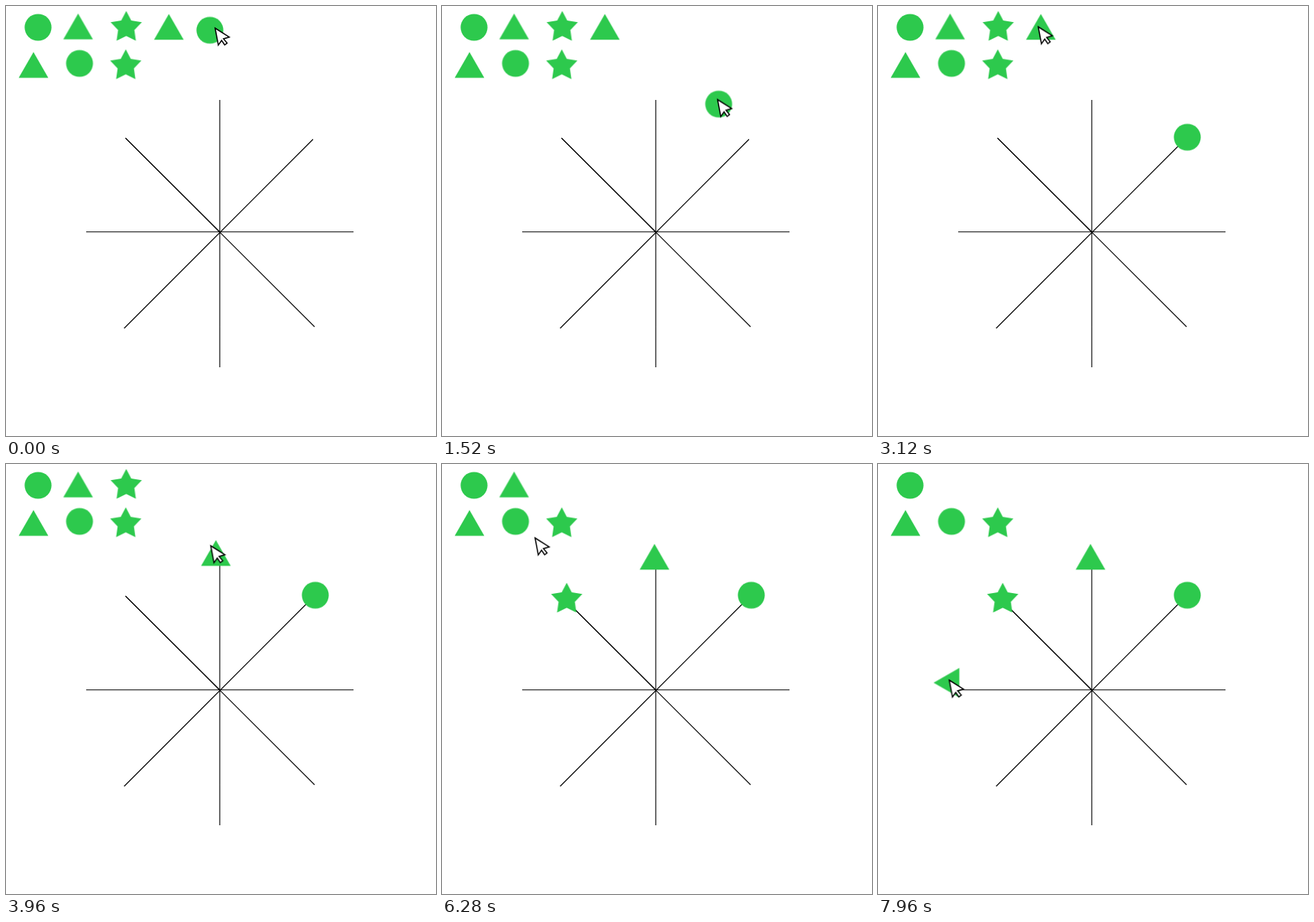
Write an HTML page that moves like this. It is 563x563 px and loops after 8 s.

```html
<!DOCTYPE html>
<html lang="en">
<head>
<meta charset="utf-8">
<title>Sorting shapes onto spokes</title>
<style>
  html, body { margin: 0; width: 100%; height: 100%; overflow: hidden; background: #fff; }
  svg { display: block; width: 100vw; height: 100vh; }
  #shapes { fill: #2dc94d; }
  #spokes { stroke: #000; stroke-width: 1.1; }
  #cursor { fill: #fff; stroke: #000; stroke-width: 1.5; }
</style>
</head>
<body>
<svg viewBox="0 0 563 563">
  <g id="spokes">
    <path d="M279.9 123V473M105 295.8H455M156.5 172.8L404 420M402 174.5L154.7 422"/>
    <path d="M156.5 172.8L280 296"/>
  </g>
  <g id="shapes"></g>
  <path id="cursor" d="M.8 1L19.3 12.7L11.8 15L16.5 20.6L13.3 23L9.3 17L5 23.2Z"/>
</svg>
<script>
const LOOP = 8000, TICK = 40;
const shapes = document.getElementById('shapes');

// Points on a circle, cycling through the given radii, first point up.
const ring = (n, ...radii) => Array.from({ length: n }, (_, i) => {
  const a = 2 * Math.PI * i / n, r = radii[i % radii.length];
  return [r * Math.sin(a), -r * Math.cos(a)].map(v => v.toFixed(2));
}).join(' ');

const kinds = {
  circle: ['circle', { r: 17.6 }],
  triangle: ['polygon', { points: ring(3, 22.4) }],
  star: ['polygon', { points: ring(10, 21.5, 11.2) }]
};

// Something that rests at a place and is sent elsewhere over a span of time.
class Actor {
  constructor(el, x, y) {
    this.el = el;
    this.stops = [{ t: 0, x, y, turn: 0 }];
  }

  go(from, to, change) {
    const last = this.stops.at(-1);
    this.stops.push({ ...last, t: from }, { ...last, ...change, t: to });
  }

  // Linear motion, advancing once per tick; the lead avoids rounding at step edges.
  play() {
    const all = [...this.stops, { ...this.stops.at(-1), t: LOOP }];
    const frames = all.map(({ t, x, y, turn }, i) => {
      const ticks = ((all[i + 1]?.t ?? t) - t) / TICK;
      return {
        offset: t / LOOP,
        transform: `translate(${x}px, ${y}px) rotate(${turn}deg)`,
        easing: `steps(${Math.max(1, Math.round(ticks))}, end)`
      };
    });
    this.el.animate(frames, { duration: LOOP, iterations: Infinity, delay: -1 });
  }
}

const cast = [];

function add(kind, x, y) {
  const [tag, attrs] = kinds[kind];
  const el = document.createElementNS('http://www.w3.org/2000/svg', tag);
  for (const name in attrs) el.setAttribute(name, attrs[name]);
  const actor = new Actor(shapes.appendChild(el), x, y);
  cast.push(actor);
  return actor;
}

add('circle', 42, 28);
const left = add('triangle', 94.4, 32.4);
const star = add('star', 157.4, 28);
const top1 = add('triangle', 213.2, 32.9);
const disc = add('circle', 267, 31.7);
add('triangle', 36, 82.8);
add('circle', 96.3, 75.2);
add('star', 156.8, 78.2);

const hand = new Actor(document.getElementById('cursor'), 273, 28);
cast.push(hand);

let now = 0;
const wait = ms => { now += ms; };

function reach(ms, x, y) {
  hand.go(now, now + ms, { x, y });
  now += ms;
}

function drag(actor, ms, drop, tip) {
  actor.go(now, now + ms, { x: drop[0], y: drop[1] });
  reach(ms, ...tip);
}

wait(360);
drag(disc, 1680, [405, 171.8], [399, 163.5]);
wait(160);
reach(920, 209, 26.3);
wait(120);
drag(top1, 760, [278.2, 127.1], [270.5, 110.5]);
wait(120);
reach(840, 149.3, 13.3);
wait(80);
drag(star, 840, [163.3, 177], [147.5, 156]);
reach(880, 89.3, 23.5);
wait(120);
drag(left, 1040, [95.3, 286.4], [92.5, 282]);
left.go(now, now + TICK, { turn: -90 });

cast.forEach(actor => actor.play());
</script>
</body>
</html>
```
